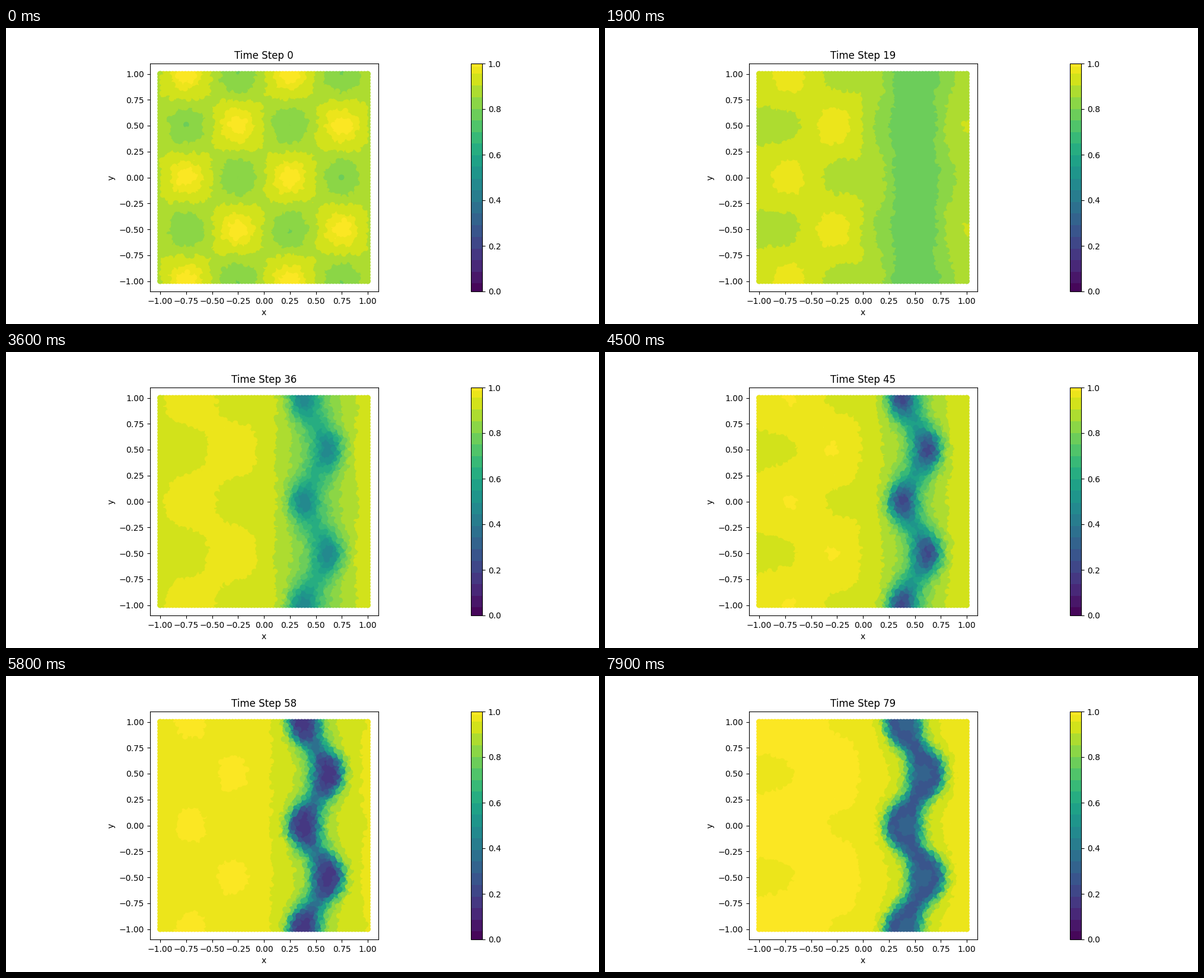
A matplotlib script for the animation above (8000 ms loop, 1000x500 px).

```python
import numpy as np
import matplotlib.pyplot as plt
from matplotlib.animation import FuncAnimation
from matplotlib.colors import ListedColormap

STEPS = 80
CELLS = 100
FEED, KILL = 0.03, 0.062
DIFF_U, DIFF_V = 8e-5, 4e-5


def mesh_points(n=66, seed=4):
    """Boundary nodes of the square, then jittered staggered interior nodes."""
    rng = np.random.default_rng(seed)
    h = 2 / n
    side = np.linspace(-1, 1, n + 1)
    one = np.ones_like(side)
    edge = np.vstack([np.c_[side, -one], np.c_[one, side],
                      np.c_[side, one], np.c_[-one, side]])
    rows = np.linspace(-1, 1, int(n * 1.15))[1:-1]
    inner = []
    for j, y in enumerate(rows):
        x = np.arange(-1 + h * (0.75 + 0.5 * (j % 2)), 1 - h / 2, h)
        inner.append(np.c_[x, np.full_like(x, y)])
    inner = np.vstack(inner)
    inner += rng.uniform(-0.3, 0.3, inner.shape) * h
    rng.shuffle(inner)
    return np.vstack([edge, inner]).T


def banded_viridis():
    """Viridis reduced to flat bands."""
    edges = np.r_[0, 0.034 + 0.0512 * np.arange(19), 0.985, 1]
    mids = (edges[:-1] + edges[1:]) / 2
    band = np.digitize(np.linspace(0, 1, 512), edges[1:-1])
    return ListedColormap(plt.get_cmap("viridis")(mids[band]))


def laplacian(a):
    p = np.pad(a, 1, mode="reflect")
    near = p[:-2, 1:-1] + p[2:, 1:-1] + p[1:-1, :-2] + p[1:-1, 2:]
    return (near - 4 * a) * (CELLS / 2) ** 2


def react():
    """Two-species reaction and diffusion; yields the first species."""
    side = np.linspace(-1, 1, CELLS + 1)
    gx, gy = np.meshgrid(side, side)
    u = 0.9 + 0.1 * np.sin(2 * np.pi * gx) * np.cos(2 * np.pi * gy)
    v = 0.0765 + 0.037 * np.sin(np.pi * gx)
    for _ in range(STEPS):
        yield u
        r = u * v * v
        du = DIFF_U * laplacian(u) + FEED * (1 - u) - r
        dv = DIFF_V * laplacian(v) + r - (FEED + KILL) * v
        u, v = u + du, v + dv


def sample(a, x, y):
    """Bilinear lookup of grid values at the mesh points."""
    px, py = (x + 1) * CELLS / 2, (y + 1) * CELLS / 2
    i = np.clip(px.astype(int), 0, CELLS - 1)
    j = np.clip(py.astype(int), 0, CELLS - 1)
    fx, fy = px - i, py - j
    low = a[j, i] * (1 - fx) + a[j, i + 1] * fx
    high = a[j + 1, i] * (1 - fx) + a[j + 1, i + 1] * fx
    return low * (1 - fy) + high * fy


x, y = mesh_points()
field = [sample(u, x, y) for u in react()]

fig, ax = plt.subplots(figsize=(10, 5), dpi=100)
dots = ax.scatter(x, y, c=field[0], cmap=banded_viridis(), vmin=0, vmax=1)
fig.colorbar(dots, ax=ax)
ax.set_aspect("equal", anchor="C")
ax.set(xlim=(-1.1, 1.1), ylim=(-1.1, 1.1), xlabel="x", ylabel="y")
ticks = np.linspace(-1, 1, 9)
ax.set_xticks(ticks)
ax.set_yticks(ticks)
title = ax.set_title("Time Step 0")


def draw(i):
    dots.set_array(field[i])
    title.set_text(f"Time Step {i}")
    return dots, title


anim = FuncAnimation(fig, draw, frames=STEPS, interval=100, repeat=True,
                     repeat_delay=0, blit=False)
plt.show()
```
